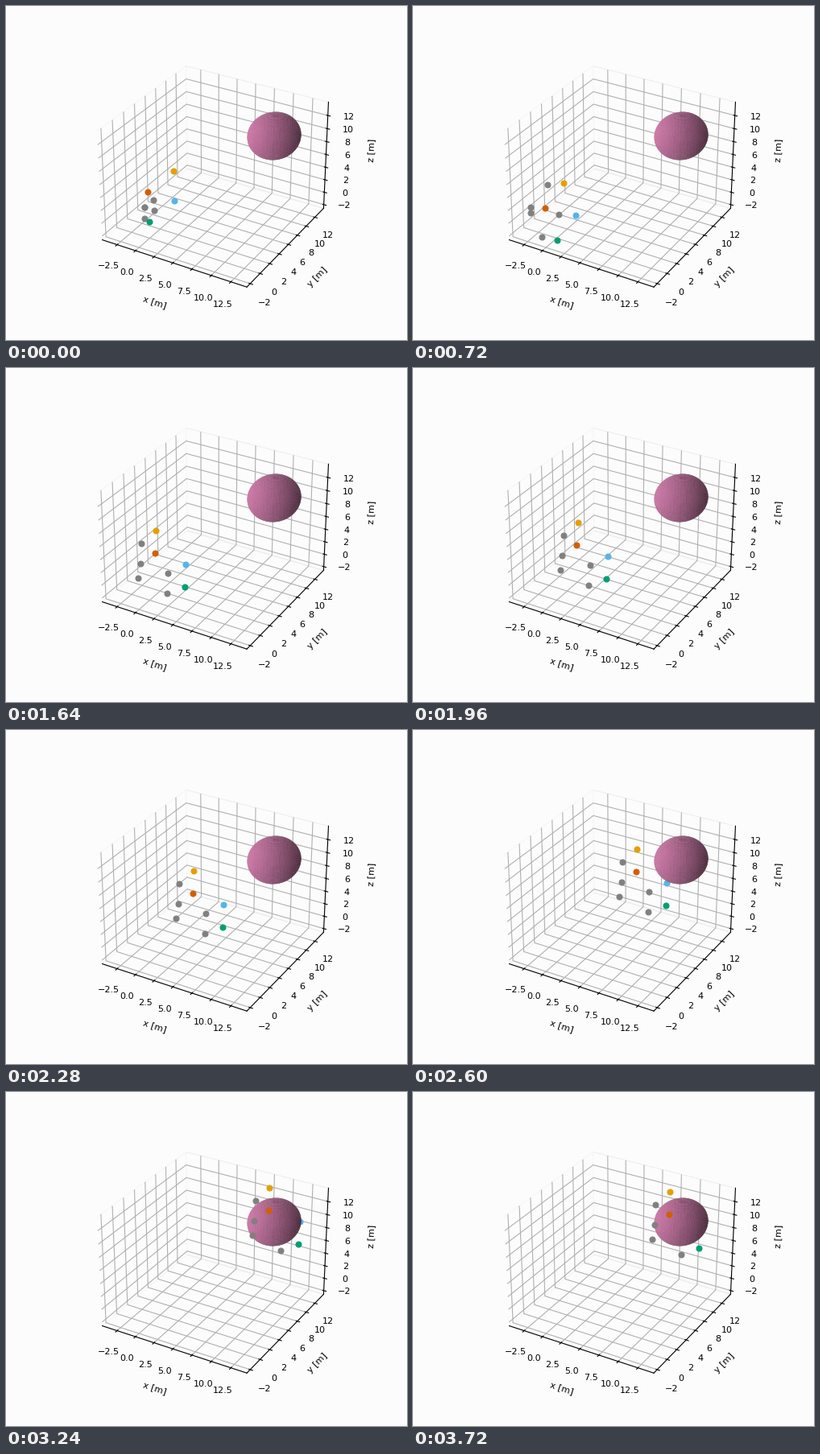
Write a matplotlib script that moves like this. It is 498x415 px and loops after 3760 ms.

```python
import numpy as np
import matplotlib.pyplot as plt
from matplotlib.animation import FuncAnimation

FRAMES, STEP = 94, 40
HEIGHT = 415
LO = np.array([-4.55, -2.67, -2.6])
HI = np.array([14.5, 14.07, 14.02])
BOX = np.array([25 / 21, 25 / 21, 25 / 28])  # axes box for a 4:4:3 aspect
ELEV, AZIM = np.radians([30, -60])
CAMERA_DIST = 10
GREY = "#808080"
CORNERS = [(0, 0), (0, 1), (1, 0), (1, 1)]  # (across, down)
CORNER_COLORS = ["#E69F00", "#D55E00", "#56B4E9", "#009E73"]


def track(times, keys):
    """Smooth curve through the keys, at rest on both ends."""
    times = np.array(times, float)
    keys = np.array(keys, float)
    slopes = np.gradient(keys, times, axis=0)
    slopes[0] = slopes[-1] = 0

    def at(t):
        t = np.clip(t, times[0], times[-1])
        i = min(np.searchsorted(times, t, "right"), len(times) - 1) - 1
        h = times[i + 1] - times[i]
        s = (t - times[i]) / h
        return ((1 + 2 * s) * (1 - s) ** 2 * keys[i]
                + s * (1 - s) ** 2 * h * slopes[i]
                + s * s * (3 - 2 * s) * keys[i + 1]
                + s * s * (s - 1) * h * slopes[i + 1])
    return at


# The swarm is two parallelograms, grey and coloured, with shared edge
# directions. Screen pixels; the shape settles before the long glide.
centre = track([0, 720, 1120, 1640, 2280, 2600, 2800, 3340, 3720],
               [(178, 252), (164, 254.5), (164, 256), (184, 249), (231, 222),
                (276, 195), (300, 181), (326.5, 165), (317, 171)])
FORMING = [0, 720, 1120, 1640]
across = track(FORMING, [(0.5, 13.5), (14, 37), (22, 42), (33, 37)])
down = track(FORMING, [(-11.5, 9.5), (-21, 28), (-20, 34), (-1.5, 25)])
shift = track(FORMING, [(15, -15.5), (19, 1), (23, -9), (20, -12)])
scale = track(FORMING, [2.75, 1.08, 1.1, 1.13])
gap = track(FORMING, [0, 7, 11, 18])


def positions(t):
    corners = np.array([(i - 0.5) * across(t) + (k - 0.5) * down(t)
                        for i, k in CORNERS])
    greys = centre(t) + corners
    straggler = greys[1] + gap(t) * np.array([-0.13, 1])
    colored = centre(t) + shift(t) + scale(t) * corners
    return np.vstack([greys, [straggler], colored])


fig = plt.figure(figsize=(4.98, 4.15), dpi=100, facecolor="#fcfcfc")
plt.rcParams.update({"font.size": 8})
ax = fig.add_subplot(projection="3d", computed_zorder=False, facecolor="#fcfcfc")
ax.view_init(elev=30, azim=-60)

u = np.linspace(0, 2 * np.pi, 100)
v = np.linspace(0, np.pi, 100)
ax.plot_surface(10 + 3 * np.outer(np.cos(u), np.sin(v)),
                10 + 3 * np.outer(np.sin(u), np.sin(v)),
                10 + 3 * np.outer(np.ones_like(u), np.cos(v)),
                color="#CC79A7", zorder=5)


def make_dot(color, hidden):
    """A dot that passes behind the sphere if hidden, else in front."""
    return ax.plot([0], [0], [0], "o", color=color, markersize=5,
                   markeredgewidth=0.8, zorder=4 if hidden else 6)[0]


BEHIND = (1, 0)
dots = [make_dot(GREY, corner == BEHIND) for corner in CORNERS]
dots.append(make_dot(GREY, False))
dots += [make_dot(color, corner == BEHIND)
         for color, corner in zip(CORNER_COLORS, CORNERS)]

ax.set(xticks=np.arange(-2.5, 13, 2.5), yticks=np.arange(-2, 13, 2),
       zticks=np.arange(-2, 13, 2),
       xlabel="x [m]", ylabel="y [m]", zlabel="z [m]")
ax.set_xlim(LO[0], HI[0])
ax.set_ylim(LO[1], HI[1])
ax.set_zlim(LO[2], HI[2])
for axis in (ax.xaxis, ax.yaxis, ax.zaxis):
    axis.pane.fill = False
ax.apply_aspect()

RIGHT = np.array([-np.sin(AZIM), np.cos(AZIM), 0])
UP = np.array([-np.sin(ELEV) * np.cos(AZIM), -np.sin(ELEV) * np.sin(AZIM), np.cos(ELEV)])


def to_data(pixels):
    """Screen pixels to data points on the plane through the box centre."""
    flipped = np.column_stack([pixels[:, 0], HEIGHT - pixels[:, 1]])
    plane = ax.transData.inverted().transform(flipped) * CAMERA_DIST
    world = plane[:, :1] * RIGHT + plane[:, 1:] * UP
    return LO + (world / BOX + 0.5) * (HI - LO)


def update(frame):
    for dot, (x, y, z) in zip(dots, to_data(positions(frame * STEP))):
        dot.set_data_3d([x], [y], [z])
    return dots


anim = FuncAnimation(fig, update, frames=FRAMES, interval=STEP, repeat=True)
plt.show()
```
